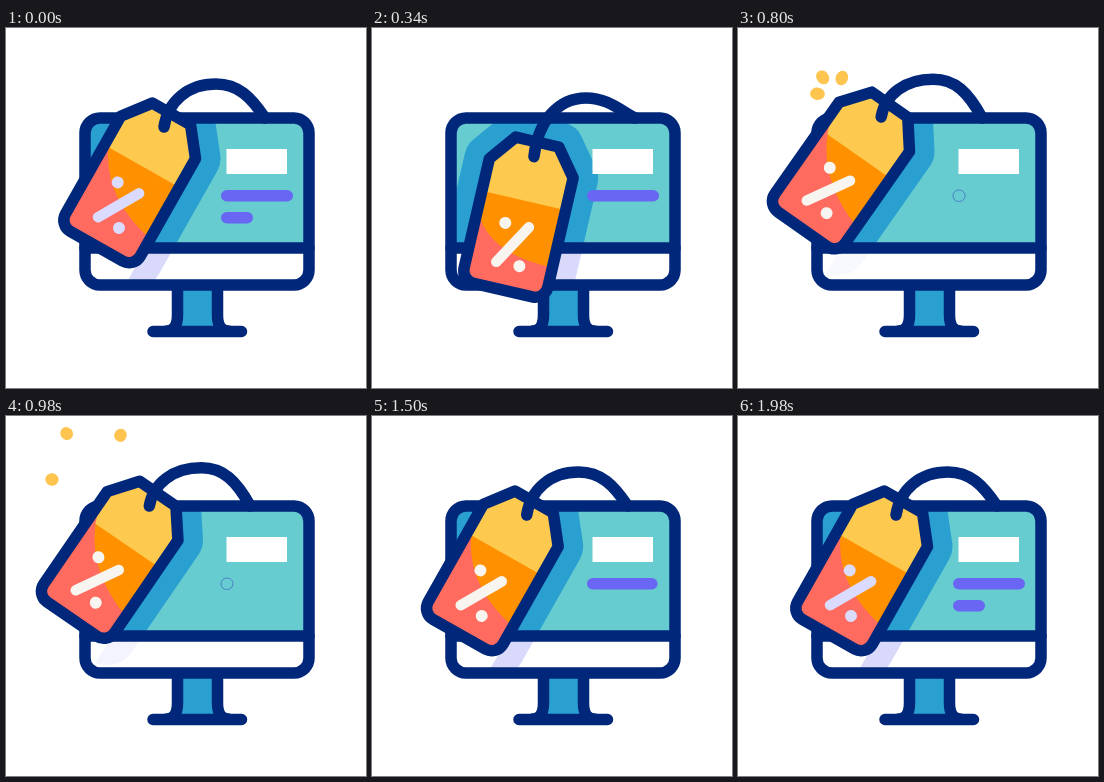
Animation of 360 by 360 pixels, one loop 2400 ms. Source, as an HTML page:

```html
<!DOCTYPE html>
<html lang="en">
<head>
<meta charset="utf-8">
<title>Discount tag</title>
<style>
  html, body { margin: 0; width: 100%; height: 100%; overflow: hidden; background: #fff; }
  svg { display: block; width: 100vw; height: 100vh; }
  .line { fill: none; stroke: #00277a; stroke-width: 11.5; stroke-linecap: round; stroke-linejoin: round; }
</style>
</head>
<body>
<svg viewBox="0 0 360 360">
  <defs>
    <path id="tagShape" d="M-22 -15H22L43 12V124A13 13 0 0 1 30 137H-30A13 13 0 0 1 -43 124V12Z"/>
    <clipPath id="tagClip"><use href="#tagShape"/></clipPath>
    <clipPath id="screenClip"><rect x="79" y="90" width="224" height="130"/></clipPath>
    <clipPath id="chinClip"><path d="M79 220H303V242Q303 257 288 257H94Q79 257 79 242Z"/></clipPath>
  </defs>

  <g id="sparks" fill="#fdc450"></g>

  <path d="M171.500 257V288Q171.500 303 160 303H223Q211.500 303 211.500 288V257Z" fill="#2aa0d0"/>
  <path class="line" d="M171.500 260V287Q171.500 303 160 303M211.500 260V287Q211.500 303 223 303M147 303.500H235.500"/>

  <rect x="79" y="90" width="224" height="167" rx="15" fill="#fff"/>
  <path d="M79 220V105Q79 90 94 90H288Q303 90 303 105V220Z" fill="#67ccd0"/>
  <g clip-path="url(#screenClip)">
    <use class="shadow" href="#tagShape" fill="#2aa0d0" stroke="#2aa0d0" stroke-width="50" stroke-linejoin="round"/>
  </g>
  <g clip-path="url(#chinClip)">
    <path id="chinShadow" class="shadow" d="M44 60H68V130Q68 152 44 160Z" fill="#d9dafb"/>
  </g>
  <rect x="220.500" y="121" width="60.500" height="25" fill="#fff"/>
  <rect id="longBar" x="215" y="162" height="11.500" rx="5.750" fill="#6866f2" stroke="#4880c4"/>
  <rect id="shortBar" x="215" y="184" height="11.500" rx="5.750" fill="#6866f2"/>
  <rect class="line" x="79" y="90" width="224" height="167" rx="15"/>
  <path class="line" d="M79 220H303"/>

  <g id="tag">
    <g clip-path="url(#tagClip)">
      <rect x="-50" y="-20" width="100" height="160" fill="#ff9100"/>
      <rect x="-50" y="-20" width="100" height="65" fill="#fdc94f"/>
      <path id="red" fill="#ff6b5e"/>
    </g>
    <use class="line" href="#tagShape"/>
    <g id="percent">
      <path d="M-13 111L11 70" stroke-width="10.500" stroke-linecap="round"/>
      <circle cx="-13" cy="71" r="6" stroke="none"/>
      <circle cx="10.500" cy="110" r="6" stroke="none"/>
    </g>
  </g>
  <path id="cord" class="line"/>
</svg>
<script>
const LOOP = 2400, STEP = 20, REST_TILT = 29.5;
const byId = id => document.getElementById(id);
const set = (el, attrs) => { for (const k in attrs) el.setAttribute(k, attrs[k]); };
const clamp = v => Math.max(0, Math.min(1, v));
const ramp = (t, from, to) => clamp((t - from) / (to - from));
const ease = (t, from, to) => { const u = ramp(t, from, to); return u * u * (3 - 2 * u); };

// The tag drops, is flung up, then settles; its height and sway follow the tilt.
function tagPose(t) {
  const swing = -17 * ease(t, 0, 380) + 24 * ease(t, 490, 855) - 7 * ease(t, 880, 1160);
  const drift = 13.5 * (ease(t, 1100, 1690) - ease(t, 340, 670));
  return { x: 158 + drift - 0.24 * swing, y: 99 - 1.8 * swing, tilt: REST_TILT + swing };
}

const sparkOrigin = { x: 98, y: 67 };
const sparks = [[38, 63], [55, 10], [117, 12]].map(([x, y]) => {
  const el = document.createElementNS("http://www.w3.org/2000/svg", "ellipse");
  byId("sparks").append(el);
  return { el, dx: x - sparkOrigin.x, dy: y - sparkOrigin.y };
});

function drawSparks(t) {
  const p = 1 - (1 - ramp(t, 735, 1120)) ** 2;
  const size = t < 735 ? 0 : 6.2 * (1 - ramp(t, 1180, 1320));
  for (const { el, dx, dy } of sparks) {
    const angle = Math.atan2(dy, dx) * 180 / Math.PI;
    set(el, { rx: size * (1.25 - 0.2 * p), ry: size,
      transform: `translate(${sparkOrigin.x + dx * p} ${sparkOrigin.y + dy * p}) rotate(${angle})` });
  }
}

function drawTag(t) {
  const { x, y, tilt } = tagPose(t);
  const transform = `translate(${x} ${y}) rotate(${tilt})`;
  set(byId("tag"), { transform });
  document.querySelectorAll(".shadow").forEach(el => set(el, { transform }));
  set(byId("chinShadow"), { opacity: clamp((36 - tilt) / 5) });

  const edge = 70 - 1.75 * (tilt - 13);
  set(byId("red"), { d: `M-50 ${edge - 8}L-40 ${edge}Q-20 ${edge / 2 + 70} 43 104V140H-50Z` });

  const top = 56 + (y - 99) * 0.47;
  set(byId("cord"), { d: `M${x} ${y}C${x + 4} ${y - (y - top) * 0.6} ${x + 24} ${top} ${x + 52} ${top}`
    + `C${x + 74} ${top} ${x + 87} ${top + 13} ${x + 101} 90` });

  const tint = 1 - ease(t, 0, 300) + ease(t, 1600, 1980);
  const color = `rgb(${248 - 29 * tint}, ${244 - 25 * tint}, ${240 + 15 * tint})`;
  set(byId("percent"), { fill: color, stroke: color });
}

function drawBars(t) {
  const fill = 1 - ramp(t, 560, 700) + ramp(t, 1180, 1350);
  set(byId("longBar"), {
    width: 72 - 60 * (ease(t, 340, 715) - ease(t, 1015, 1550)),
    "fill-opacity": fill,
    "stroke-opacity": fill < 0.4 ? 1 : 0
  });
  set(byId("shortBar"), { width: 32 * (1 - ease(t, 0, 300) + ease(t, 1640, 1940)) });
}

const start = performance.now();
function tick() {
  const now = (performance.now() - start) % LOOP;
  const t = Math.floor(now / STEP) * STEP;
  drawTag(t);
  drawBars(t);
  drawSparks(t);
  requestAnimationFrame(tick);
}
tick();
</script>
</body>
</html>
```
